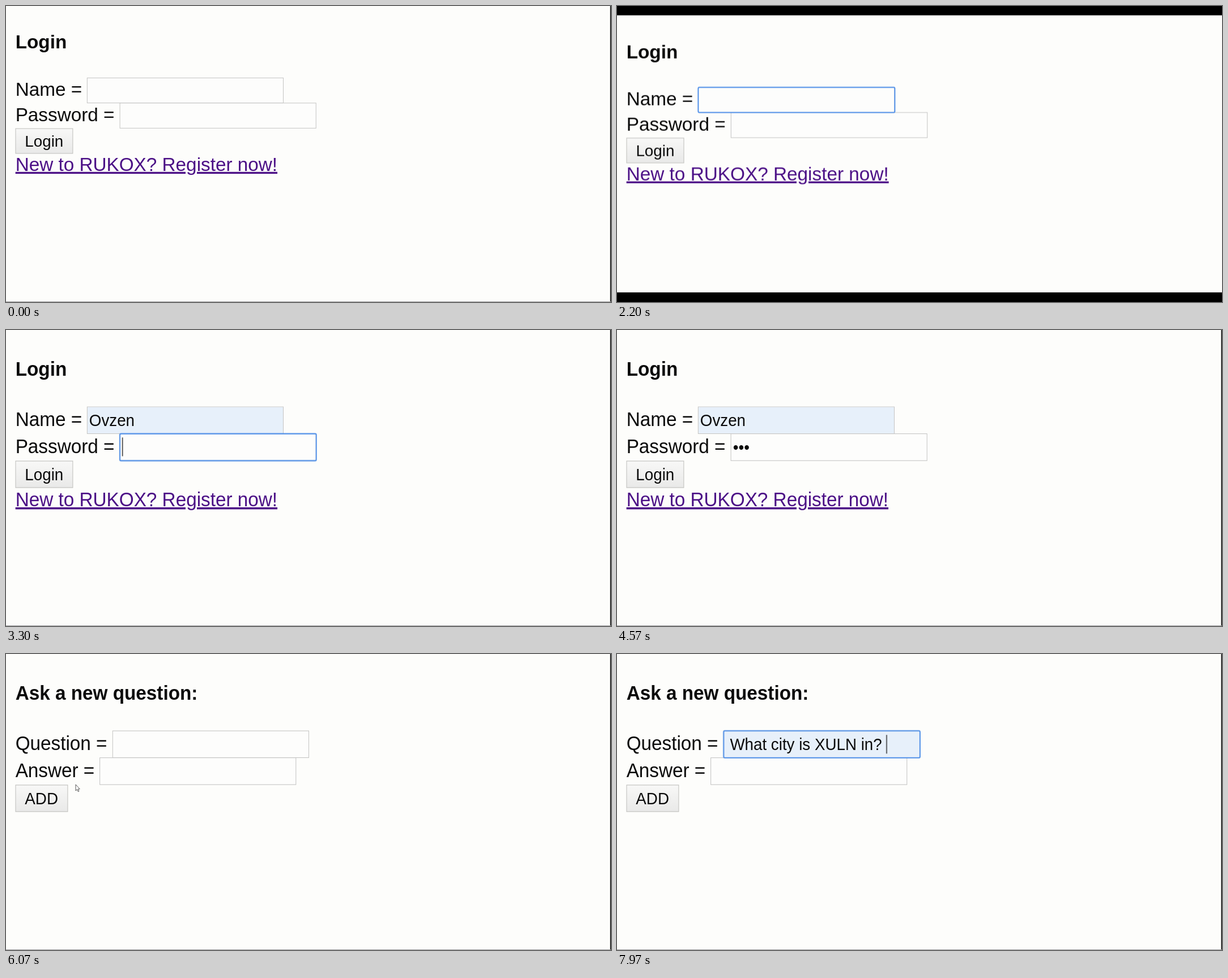
Recreate the animation shown at these times as an HTML page. Size 1068 by 524 pixels, loop 8 s.

```html
<!DOCTYPE html>
<html lang="en">
<head>
<meta charset="utf-8">
<title>Login and ask</title>
<style>
  html, body { margin: 0; width: 100%; height: 100%; overflow: hidden; background: #fdfdfb; }
  svg { display: block; width: 1068px; height: 524px; }
  text { font: 33.33px "Liberation Sans", Arial, sans-serif; fill: #0a0a0a; white-space: pre; }
  .head { font-weight: bold; }
  .small { font-size: 27.78px; }
  .link { fill: #4b0f86; text-decoration: underline; }
  .field { fill: #fdfdfc; stroke: #c3c3c2; }
  .button { fill: url(#shade); stroke: #bdbdba; }
  .ring { fill: none; stroke: #4f8fe8; stroke-width: 2; }
  .auto { fill: #e7f0fa; }
  .caret { fill: #111; }
  .cursor { fill: #fff; stroke: #444; stroke-width: .9; stroke-linejoin: round; }

  /* Hard switches on an 8 s loop */
  .sw { animation: 8s step-end infinite; }
  #view { animation-name: view; }
  #bars { animation-name: bars; }
  #edges { animation-name: edges; }
  #login { animation-name: login; }
  #ask { animation-name: ask; }
  #nameRing { animation-name: name-ring; }
  #nameCaret { animation-name: name-caret; }
  #nameFill { animation-name: name-fill; }
  #passRing { animation-name: pass-ring; }
  #passCaret { animation-name: pass-caret; }
  #dot { animation-name: dot; }
  #dots { animation-name: dots; }
  #askRing { animation-name: ask-ring; }
  #askFill { animation-name: ask-fill; }
  #askCaret { animation-name: ask-caret; }
  #hand { animation-name: hand; }
  #arrow { animation: arrow 8s step-end infinite, move 8s linear infinite; }

  @keyframes view {
    0% { transform: scale(.999, 1); }
    .375% { transform: scale(.999, 1.069); }
    4.625% { transform: translateY(16.7px); }
    34.125%, 100% { transform: scale(.999, 1.069); }
  }
  @keyframes bars { 0% { opacity: 0 } 4.625% { opacity: 1 } 34.125%, 100% { opacity: 0 } }
  @keyframes edges { 0% { opacity: 1 } 4.625% { opacity: 0 } 34.125%, 100% { opacity: 1 } }
  @keyframes login { 0% { opacity: 1 } 72.875%, 100% { opacity: 0 } }
  @keyframes ask { 0% { opacity: 0 } 72.875%, 100% { opacity: 1 } }
  @keyframes name-ring { 0% { opacity: 0 } 19.625% { opacity: 1 } 34.125%, 100% { opacity: 0 } }
  @keyframes name-caret { 0% { opacity: 0 } 19.625% { opacity: 1 } 26.25%, 100% { opacity: 0 } }
  @keyframes name-fill { 0% { opacity: 0 } 29.625%, 100% { opacity: 1 } }
  @keyframes pass-ring { 0% { opacity: 0 } 34.125% { opacity: 1 } 57.125%, 100% { opacity: 0 } }
  @keyframes pass-caret {
    0% { opacity: 0 }
    41.25% { opacity: 1; transform: none; }
    44.625% { opacity: 1; transform: translateX(9.7px); }
    47.5% { opacity: 0 }
    50.375% { opacity: 1; transform: translateX(29.2px); }
    57.125%, 100% { opacity: 0 }
  }
  @keyframes dot { 0% { opacity: 0 } 44.625%, 100% { opacity: 1 } }
  @keyframes dots { 0% { opacity: 0 } 50.375%, 100% { opacity: 1 } }
  @keyframes ask-ring { 0% { opacity: 0 } 90%, 100% { opacity: 1 } }
  @keyframes ask-fill { 0% { opacity: 0 } 96.25%, 100% { opacity: 1 } }
  @keyframes ask-caret { 0% { opacity: 0 } 99.625%, 100% { opacity: 1 } }
  @keyframes hand { 0% { opacity: 0 } 80.375% { opacity: 1 } 85.875%, 100% { opacity: 0 } }
  @keyframes arrow { 0% { opacity: 0 } 64.125% { opacity: 1 } 80.375%, 100% { opacity: 0 } }
  @keyframes move {
    0%, 64.125% { transform: translate(430px, 300px); }
    67.875%, 68.375% { transform: translate(311.5px, 230.5px); }
    70.375%, 74% { transform: translate(70px, 258px); }
    80.375%, 100% { transform: translate(249px, 167px); }
  }
</style>
</head>
<body>
<svg viewBox="0 0 1068 524">
  <defs>
    <linearGradient id="shade" x2="0" y2="1">
      <stop stop-color="#f8f8f7"/>
      <stop offset="1" stop-color="#e9e9e8"/>
    </linearGradient>
  </defs>

  <g id="view" class="sw">
    <g id="login" class="sw">
      <text class="head" x="16.67" y="75.5">Login</text>
      <text x="16.67" y="159.2">Name =</text>
      <rect class="field" x="143.5" y="127.3" width="346.5" height="44.3"/>
      <g id="nameFill" class="sw">
        <rect class="auto" x="144" y="127.8" width="345.5" height="43.3"/>
        <text class="small" x="147" y="159">Ovzen</text>
      </g>
      <text x="16.67" y="203.6">Password =</text>
      <rect class="field" x="201.3" y="171.8" width="346.5" height="44.5"/>
      <text id="dot" class="small sw" x="205" y="203.6">•</text>
      <text id="dots" class="small sw" x="214.7" y="203.6">••</text>
      <rect id="nameRing" class="ring sw" x="143.4" y="127.2" width="347" height="44.6" rx="2"/>
      <rect id="nameCaret" class="caret sw" x="147.6" y="134" width="1.3" height="31"/>
      <rect id="passRing" class="ring sw" x="201.2" y="171.8" width="347" height="44.6" rx="2"/>
      <rect id="passCaret" class="caret sw" x="205.2" y="178" width="1.3" height="31"/>
      <rect class="button" x="17" y="217" width="101" height="44"/>
      <text class="small" x="33.4" y="248.6">Login</text>
      <text class="link" x="16.67" y="291.7">New to RUKOX? Register now!</text>
    </g>

    <g id="ask" class="sw">
      <text class="head" x="16.67" y="75.5">Ask a new question:</text>
      <text x="16.67" y="159.2">Question =</text>
      <rect class="field" x="188.5" y="127.3" width="346.5" height="44.3"/>
      <g id="askFill" class="sw">
        <rect class="auto" x="189" y="127.8" width="345.5" height="43.3"/>
        <text class="small" x="199.6" y="159">What city is XULN in?</text>
      </g>
      <text x="16.67" y="203.6">Answer =</text>
      <rect class="field" x="165.8" y="171.8" width="346.5" height="44.5"/>
      <rect id="askRing" class="ring sw" x="188.4" y="127.2" width="347" height="44.6" rx="2"/>
      <rect id="askCaret" class="caret sw" x="475.8" y="134" width="1.3" height="31"/>
      <rect class="button" x="17" y="217" width="92" height="44"/>
      <text class="small" x="33.4" y="248.6">ADD</text>
    </g>
  </g>

  <g id="edges" class="sw">
    <rect x="1066.6" width="1.4" height="524"/>
    <rect y="523" width="1068" height="1" fill="#999"/>
  </g>
  <g id="bars" class="sw">
    <rect width="1068" height="16.5"/>
    <rect y="507" width="1068" height="17"/>
  </g>

  <path id="arrow" class="cursor" d="M0 0V11L2.5 8.7 4.3 12.6 5.9 11.9 4.2 8H7.3Z"/>
  <g id="hand" class="sw">
    <path class="cursor" transform="translate(246 167.5)"
      d="M3 10V1.8C3 .3 5 .3 5 1.8V7L9.5 8.2Q11 8.7 10.8 10.5L10 14.5V17H4.5V15L.8 10.5C.2 9.2 1.8 8.6 3 10Z"/>
  </g>
</svg>
</body>
</html>
```
